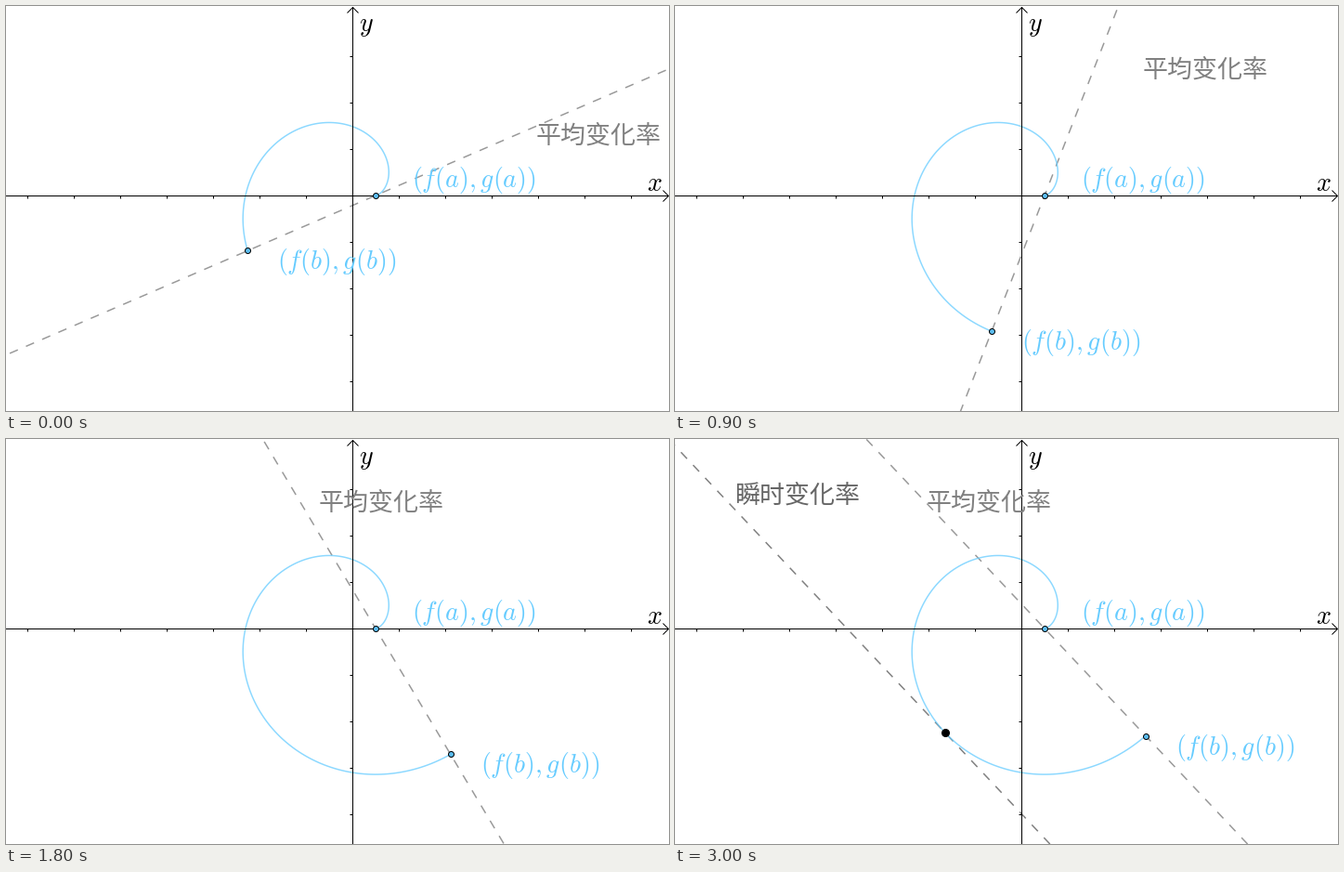
Write a matplotlib script that moves like this. It is 714x436 px and loops after 3150 ms.

```python
import numpy as np
import matplotlib.pyplot as plt
from matplotlib.animation import FuncAnimation

W, H, DPI = 714, 436, 100
PT = 72 / DPI                  # points per pixel
OX, OY, UNIT = 373, 204, 50    # origin and scale in pixels
FRAMES, STEP_MS = 21, 150
T_START, T_END, T_STEP = 5.0, 7.0, 0.15
DASH = 9.5                     # length of a dash and of a gap
MARGIN = 13.4                  # dashed lines start this far off the stage
SKY, GREY, POINT = "#66ccff", "#999999", "#5bbcf0"

plt.rcParams["mathtext.fontset"] = "cm"
plt.rcParams["path.simplify"] = False

fig = plt.figure(figsize=(W / DPI, H / DPI), dpi=DPI, facecolor="white")
ax = fig.add_axes([0, 0, 1, 1])
ax.set_xlim(0, W)
ax.set_ylim(H, 0)
ax.axis("off")


def involute(t):
    """Involute of a circle with radius 1/2, in pixels."""
    x = 0.5 * (np.cos(t) + t * np.sin(t))
    y = 0.5 * (np.sin(t) - t * np.cos(t))
    return OX + UNIT * x, OY - UNIT * y


def stroke(xs, ys, color, width, z, alpha=None):
    return ax.plot(xs, ys, color=color, lw=width * PT, zorder=z, alpha=alpha,
                   solid_capstyle="butt", snap=False)[0]


def dot(x, y, size, fill):
    return ax.plot([x], [y], "o", ms=size * PT, mfc=fill, mec="black",
                   mew=PT, zorder=7, snap=False)[0]


def formula(x, y, body, color):
    return ax.text(x, y, f"${body}$", color=color, fontsize=28 * PT,
                   va="baseline", zorder=6)


def caption(x, y, body, color):
    return ax.text(x, y, body, color=color, fontsize=27 * PT, va="baseline",
                   family="Noto Sans CJK JP", zorder=5)


def draw_axes():
    kw = dict(color="black", width=1, z=3)
    cx, cy = OX + 0.5, OY + 0.5    # pixel centres keep the axes crisp
    stroke([0, W - 1], [cy, cy], **kw)
    stroke([cx, cx], [1, H], **kw)
    stroke([W - 6.5, W - 0.5, W - 6.5], [cy - 6, cy, cy + 6], **kw)
    stroke([cx - 6, cx, cx + 6], [7.5, 1.5, 7.5], **kw)
    for i in range(-7, 7):
        if i:
            x = cx + UNIT * i
            stroke([x, x], [cy, cy + 3], **kw)
    for i in range(-3, 5):
        if i:
            y = cy + UNIT * i
            stroke([cx - 3, cx], [y, y], **kw)
    formula(690, 199, "x", "black")
    formula(380.5, 27, "y", "black")


def dashes(x, y, run):
    """Dashed line through (x, y); run is its dx/dy on screen."""
    step = np.array([run, 1.0]) / np.hypot(run, 1)
    if abs(run) > 1:               # flat: from the left edge
        step *= np.sign(run)
        back = (x + MARGIN) / step[0]
    else:                          # steep: from the top edge
        back = (y + MARGIN) / step[1]
    begin = np.array([x, y]) - back * step
    at = np.arange(0, np.hypot(W, H) + 4 * MARGIN, 2 * DASH)
    at = np.column_stack([at, at + DASH, np.full_like(at, np.nan)]).ravel()
    return begin[0] + at * step[0], begin[1] + at * step[1]


def caption_place(run):
    """Left edge and baseline of the caption, kept inside the stage."""
    exit_x = AX - run * AY
    exit_y = max(0, AY + (W - AX) / run) if run < 0 else 0
    gap = 54 + 11 * run if run > 0 else 29.7 + 9.5 * run
    return min(exit_x + gap, 571), exit_y + (79.5 if exit_y else 76.5)


AX, AY = involute(0.0)
BX, BY = involute(T_END)
RUN_END = (BX - AX) / (BY - AY)
TX, TY = involute(2 * np.pi - np.arctan2(1, RUN_END))

draw_axes()
curve = stroke([], [], SKY, 1.5, 2, alpha=0.75)
secant = stroke([], [], GREY, 1.5, 1)
tangent = stroke(*dashes(TX, TY, RUN_END), "#808080", 1.5, 1)
touch = dot(TX, TY, 8, "black")
dot(AX, AY, 6, POINT)
end = dot(AX, AY, 6, POINT)
formula(437, 194.5, "(f(a),g(a))", SKY)
end_label = formula(0, 0, "(f(b),g(b))", SKY)
mean_text = caption(0, 0, "平均变化率", "#808080")
local_text = caption(64, 68.5, "瞬时变化率", "#666666")


def update(k):
    raw = T_START + T_STEP * k
    t = min(raw, T_END)
    bx, by = involute(t)
    run = (bx - AX) / (by - AY)
    curve.set_data(*involute(np.linspace(0, t, 300)))
    secant.set_data(*dashes(AX, AY, run))
    end.set_data([bx], [by])
    end_label.set_position((bx + 32, by + 20))
    mean_text.set_position(caption_place(run))

    fade = float(np.clip(raw - T_END, 0, 1))
    for item in (tangent, local_text):
        item.set_alpha(fade)
    touch.set_visible(fade > 0)
    touch.set_markerfacecolor(str(1 - fade))
    return curve, secant, end, end_label, mean_text, tangent, local_text, touch


anim = FuncAnimation(fig, update, frames=FRAMES, interval=STEP_MS,
                     init_func=lambda: update(0), repeat=True,
                     repeat_delay=0, blit=False)
plt.show()
```
